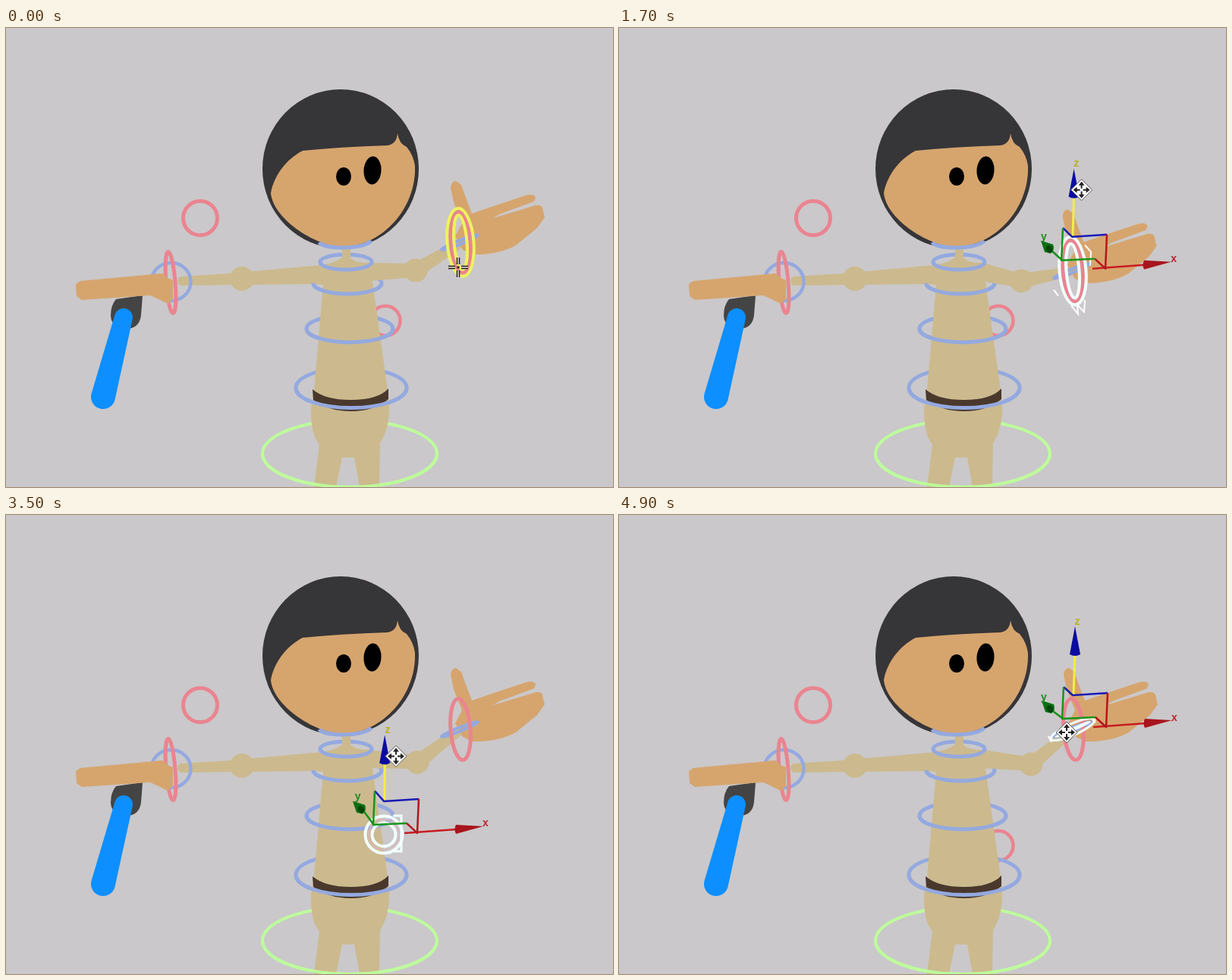
An HTML page with a canvas for the animation above (5000 ms loop, 800 px wide and 606 px high).

```html
<!DOCTYPE html>
<html lang="en">
<head>
<meta charset="utf-8">
<title>Character rig</title>
<style>
html, body { margin: 0; width: 100%; height: 100%; overflow: hidden; background: #cac8ca; }
canvas { display: block; }
</style>
</head>
<body>
<canvas id="stage" width="800" height="606"></canvas>
<script>
const c = document.getElementById('stage').getContext('2d');
const BG = '#cac8ca', SKIN = '#d6a56e', BODY = '#ccba8e', DARK = '#363538';
const BLUE = '#94a9e0', RED = '#ea8490', GREEN = '#bdfd9b', HOVER = '#eef35e', PICK = '#f2ffff';
const TAU = Math.PI * 2;

const clamp = v => Math.max(0, Math.min(1, v));
const smooth = (t, a, b) => { const u = clamp((t - a) / (b - a)); return u * u * (3 - 2 * u); };

function fill(d, color) { c.fillStyle = color; c.fill(new Path2D(d)); }
function line(d, color, w = 2) { c.strokeStyle = color; c.lineWidth = w; c.stroke(new Path2D(d)); }
function disc(x, y, rx, ry, color, rot = 0) {
  c.fillStyle = color;
  c.beginPath();
  c.ellipse(x, y, rx, ry, rot, 0, TAU);
  c.fill();
}
function ring(x, y, rx, ry, color, w = 5, rot = 0, from = 0, to = TAU) {
  c.strokeStyle = color;
  c.lineWidth = w;
  c.beginPath();
  c.ellipse(x, y, rx, ry, rot, from, to);
  c.stroke();
}
// Tapered limb with round ends
function limb(x1, y1, r1, x2, y2, r2, color) {
  const a = Math.atan2(y2 - y1, x2 - x1) + Math.PI / 2;
  c.fillStyle = color;
  c.beginPath();
  c.arc(x1, y1, r1, a, a + Math.PI);
  c.arc(x2, y2, r2, a + Math.PI, a + TAU);
  c.fill();
}
function at(x, y, draw) {
  c.save();
  c.translate(x, y);
  draw();
  c.restore();
}

const bodyRings = [
  [448, 309, 34, 10, BLUE], [450, 337, 45, 14, BLUE], [453, 397, 57, 18, BLUE],
  [455, 475, 73, 26.5, BLUE], [453, 562, 115, 44, GREEN, 4]
];

function torso() {
  for (const r of bodyRings) ring(...r);
  fill('M443 285V303Q432 312 405 314L316 322V339L405 338 418 339 406 478 402 502Q401 535 413 550L406 606H435L443 567H459L466 606H492L493 548Q505 530 505 502L503 478 483 335V310Q460 311 454 303V285Z', BODY);
  fill('M404 477Q420 491 455 491T504 476V490Q485 506 455 506T405 491Z', '#4a382d');
}
function head() {
  disc(441, 186, 103, 105, DARK);
  fill('M349 218C353 196 368 174 391 162Q440 157 503 155Q515 153 516 139Q518 153 528 157Q537 168 539 182C541 238 496 289 442 289C405 287 352 251 349 218Z', SKIN);
  disc(445, 196, 10, 12, '#000');
  disc(483, 188, 11.5, 18.5, '#000', .06);
  ring(447, 280, 35, 10, BLUE, 5, -.03, .2, 2.95);
}
function leftArm() {
  limb(311, 331, 8, 232, 334, 6, BODY);
  disc(311, 331, 16, 16, BODY);
  ring(217.5, 335, 26, 25, BLUE, 4.5);
  ring(217, 336, 6, 41, RED, 5, -.08, Math.PI / 2, Math.PI * 1.5);
  fill('M145 358L180 353 178 379Q176 397 158 397Q139 396 138 380Q138 366 145 358Z', '#444');
  fill('M92 338L98 334 206 324 213 330 220 333V358L213 364 201 358 190 353 100 359 93 354Z', SKIN);
  ring(217, 336, 6, 41, RED, 5, -.08, -Math.PI / 2, Math.PI / 2);
  limb(155, 382, 12, 128, 487, 16, '#0d8fff');
  ring(256, 251, 22.5, 22.5, RED);
}
function rightArm(dx, dy, ex, ey) {
  limb(478, 322, 12, ex, ey, 9, BODY);
  limb(ex, ey, 10, 596 + dx, 286 + dy * .94, 6, BODY);
  disc(ex, ey, 15.5, 15.5, BODY);
  at(dx, dy, () => fill('M586 211Q587 202 593 202L600 207 606 224 614 245 640 236 685 221Q696 218 698 224L696 229 650 246 642 251 698 234Q708 232 708 243L710 250 700 264 672 287Q648 300 615 299L602 293 592 275 601 258 590 230Z', SKIN));
}

// A control ring wrapped in two highlight outlines
function wrap(x, y, rx, ry, rot, color, gap, w) {
  ring(x, y, rx + gap, ry + gap, color, w, rot);
  ring(x, y, Math.max(1, rx - gap), Math.max(1, ry - gap), color, w, rot);
}
function wristRings(hot, picked) {
  ring(598, 283, 26, 2.5, BLUE, 4, -.38);
  ring(599, 283, 13, 40.5, RED, 5, -.08);
  const color = picked === 'wrist' ? PICK : HOVER;
  if (hot === 'wrist' || picked === 'wrist') wrap(599, 283, 13, 40.5, -.08, color, 4.5, 4);
  if (picked === 'wrist') line('M615 249L623 258 622 276M574 308L580 316M597 329L606 340 605 328 614 337 615 321', '#fff', 2);
  if (hot === 'twist' || picked === 'twist') {
    wrap(598, 283, 28, 4, -.42, picked ? PICK : HOVER, 3.5, 3);
    line('M566 292L570 300M622 268L628 274', '#fff');
  }
}
function poleRing(y, hot, picked) {
  if (!hot && !picked) return;
  ring(498, y, 20, 20, hot ? RED : '#d8b9bd', 2);
  wrap(498, y, 20, 20, 0, hot ? HOVER : PICK, 4.5, 4);
  if (picked) line(`M510 ${y - 25}H521V${y + 22}H511`, PICK, 3);
}

function gizmo(x, y) {
  const k = (y - 282) / 155, up = -135 + 4 * k, lean = 3 - 2 * k, yy = -8 * k;
  at(x, y, () => {
    c.lineJoin = 'round';
    line(`M${lean} ${up + 36}L1 -44`, '#f3ee42', 3);
    line('M27 -2L96 -7', '#c81c20', 2.5);
    line(`M-26 ${yy - 23}L-14 -14`, '#169019', 2.5);
    line(`M-12 ${-55 - 3 * k}L0 -44 46 -47`, '#1a1ab4', 2.5);
    line('M46 -47L44 -2 30 -15', '#b8131d', 2.5);
    line(`M-12 ${-55 - 3 * k}L-14 -13 30 -15`, '#17951b', 2.5);
    fill(`M${lean} ${up}L${lean - 7} ${up + 37}Q${lean} ${up + 41} ${lean + 7} ${up + 37}Z`, '#0b0ba2');
    fill('M131 -11L95 -13Q92 -7 95 -1Z', '#a8141c');
    fill(`M-41 ${yy - 37}L-25 ${yy - 32}Q-22 ${yy - 25} -28 ${yy - 20}L-36 ${yy - 22}Z`, '#0c6f12');
    disc(-30, yy - 26, 4, 5, '#07460a', -.6);
    c.font = 'bold 14px "Liberation Sans", Arial, sans-serif';
    c.textAlign = 'center';
    const label = (s, lx, ly, color) => { c.fillStyle = color; c.fillText(s, lx, ly); };
    label('z', 6 - k, -137 + 3 * k, '#b9b023');
    label('x', 134, -10 - k, '#bd2832');
    label('y', -38 + 4 * k, -37 - 10 * k, '#1a8a20');
  });
}

const cursors = {
  arrow() {
    const d = 'M0 0V23L5 18 9 27 13 25 9 17H16Z';
    fill(d, '#fff');
    line(d, '#222', 1.3);
  },
  move() {
    const d = 'M0 -14L14 0 0 14 -14 0Z';
    fill(d, '#fff');
    line(d, '#555', 1);
    line('M0 -9V9M-9 0H9', '#222', 2);
    for (let i = 0; i < 4; i++) {
      c.rotate(Math.PI / 2);
      fill('M0 -11L4 -6H-4Z', '#222');
    }
    c.fillStyle = '#fff';
    c.fillRect(-2, -2, 4, 4);
  },
  cross() {
    const d = 'M0 -13V-4M0 4V13M-13 0H-4M4 0H13';
    line(d, '#1c1c1c', 4.5);
    line(d, '#f4e4dc', 1.5);
    c.fillStyle = '#1c1c1c';
    c.fillRect(-1.5, -1.5, 3, 3);
  }
};
const pointerPath = [
  [0, 596, 316], [300, 596, 316], [700, 626, 172], [850, 611, 176], [1950, 611, 176],
  [2200, 525, 367], [2450, 514, 380], [2700, 514, 380], [2950, 514, 283], [3749, 514, 283],
  [3750, 514, 334], [3900, 514, 334], [4200, 537, 324], [4500, 590, 287], [5000, 590, 287]
];
const pointerKinds = [
  [200, 'cross'], [400, 'move'], [800, 'arrow'], [2000, 'move'], [2400, 'arrow'], [2600, 'cross'],
  [2700, 'move'], [2900, 'arrow'], [3900, 'move'], [4500, 'arrow'], [4600, 'cross'], [5000, 'move']
];
function pointer(t, dx, dy) {
  const i = pointerPath.findIndex(p => p[0] > t);
  const [t0, x0, y0] = pointerPath[i - 1], [t1, x1, y1] = pointerPath[i];
  const u = smooth(t, t0, t1);
  at(x0 + (x1 - x0) * u + dx, y0 + (y1 - y0) * u + dy, cursors[pointerKinds.find(k => t < k[0])[1]]);
}

function draw(t) {
  const drag = Math.sin(Math.PI * clamp((t - 900) / 1050)) ** 2;
  const pole = smooth(t, 3050, 3750), poleY = 386.5 + 50 * pole;
  const picked = t < 200 ? '' : t < 2600 ? 'wrist' : t < 4600 ? 'pole' : 'twist';
  const hot = t < 200 ? 'wrist' : t >= 2400 && t < 2600 ? 'pole' : t >= 4500 && t < 4600 ? 'twist' : '';
  const dx = -3 * drag, dy = 81.5 * drag;

  c.fillStyle = BG;
  c.fillRect(0, 0, 800, 606);
  if (picked !== 'pole') ring(500, poleY, 19.5, 19.5, RED, 4.5);
  torso();
  head();
  leftArm();
  rightArm(dx, dy, 540 - 21 * drag + 3 * pole, 320 + 30 * drag + 9 * pole);
  for (const [x, y, rx, ry, color, w] of bodyRings) ring(x, y, rx, ry, color, w, 0, 0, Math.PI);
  at(dx * .7, dy, () => wristRings(hot, picked));
  poleRing(poleY, hot === 'pole', picked === 'pole');
  if (picked === 'pole') gizmo(498, poleY);
  else if (picked) gizmo(598 + dx * .7, 282 + dy);
  pointer(t, dx, dy + (t < 3750 ? 50 * pole : 0));
}

let start;
function tick(now) {
  start ??= now;
  draw(Math.floor((now - start) % 5000 / 100) * 100);
  requestAnimationFrame(tick);
}
requestAnimationFrame(tick);
</script>
</body>
</html>
```
